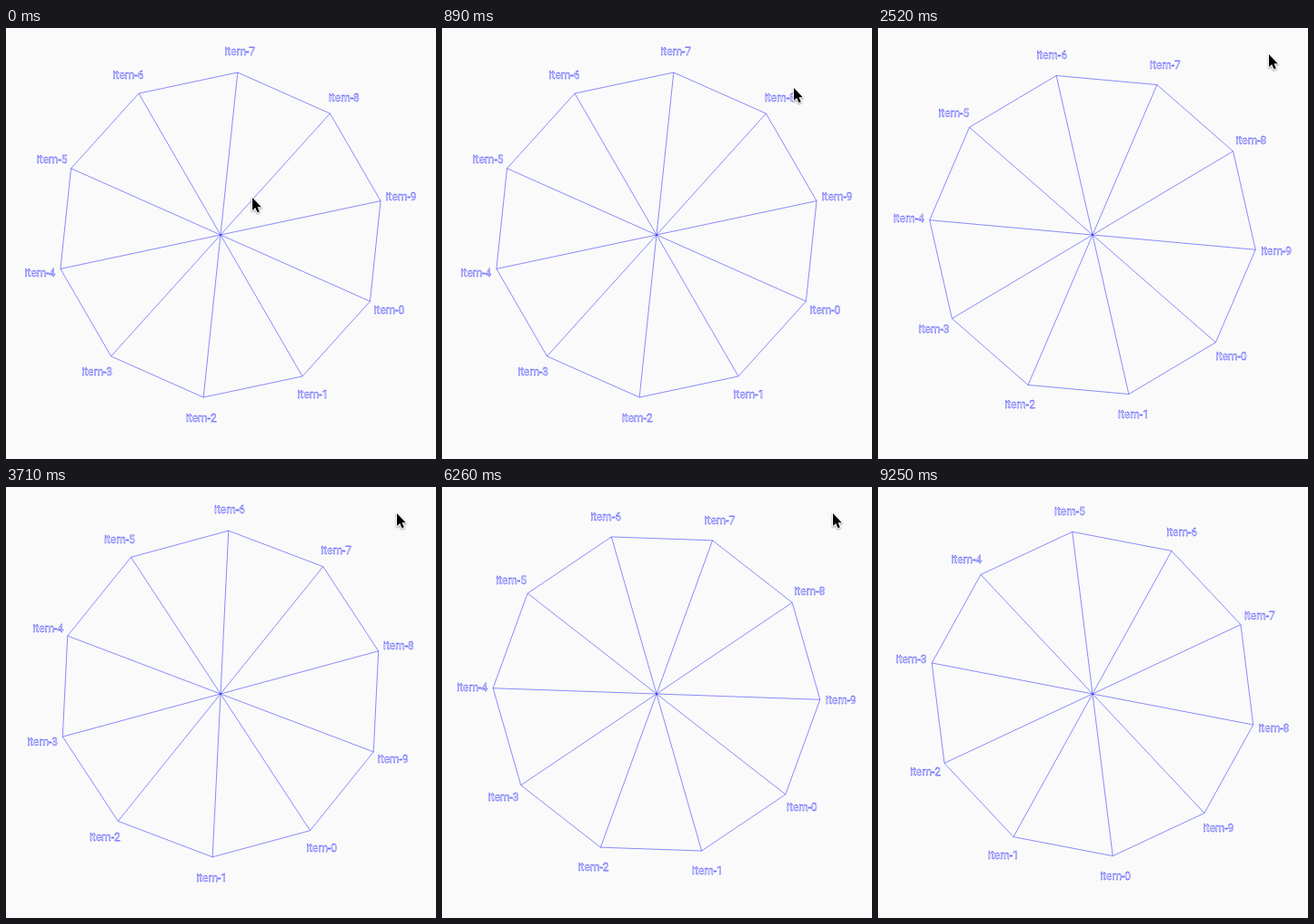
Recreate the animation shown at these times as an HTML page with a canvas. Size 473x475 px, loop 9750 ms.

```html
<!DOCTYPE html>
<html lang="en">
<head>
<meta charset="utf-8">
<title>Item wheel</title>
<style>
  html, body { margin: 0; width: 100%; height: 100%; overflow: hidden; background: #fafafa; }
  canvas { display: block; }
</style>
</head>
<body>
<canvas id="stage" width="473" height="475"></canvas>
<script>
const ctx = document.getElementById('stage').getContext('2d');
const LOOP = 9750, COUNT = 10, CX = 236, CY = 228, RADIUS = 180, LABEL_RADIUS = 203;

// The wheel jumps: start ms and angle of item-0 in degrees
const turns = [[0, 24], [1790, 41.2], [3710, 56.8], [6110, 45], [6260, 38], [8360, 82.9]];

// The pointer glides, seen only once per tick: first tick, last tick, end point
const TICK = 149.2, PHASE = 6, HOME = [271, 187];
const glides = [
  [0, 3, 398, 75], [3, 6, 387, 66], [13, 16, 430, 29], [58, 59, 443, 414], [59, 62, 443, 500]
];

const arrow = new Path2D('M0 0V14L3.2 11 5.5 16.2 7.8 15.2 5.6 10.2H9.8Z');

function pointerAt(t) {
  const tick = Math.floor((t + PHASE) / TICK);
  let [x, y] = HOME;
  for (const [from, to, endX, endY] of glides) {
    const p = Math.min(1, Math.max(0, (tick - from) / (to - from)));
    const ease = p * p * (3 - 2 * p);
    x += (endX - x) * ease;
    y += (endY - y) * ease;
  }
  return [x, y];
}

function drawWheel(angle) {
  const point = (i, r) => {
    const a = (angle + i * 360 / COUNT) * Math.PI / 180;
    return [CX + r * Math.cos(a), CY + r * Math.sin(a)];
  };
  ctx.strokeStyle = '#00f';
  ctx.lineJoin = 'round';
  ctx.font = '12px Roboto, sans-serif';
  ctx.textAlign = 'center';
  ctx.textBaseline = 'middle';
  for (let i = 0; i < COUNT; i++) {
    ctx.lineWidth = 0.45;
    ctx.beginPath();
    ctx.moveTo(CX, CY);
    ctx.lineTo(...point(i, RADIUS));
    ctx.lineTo(...point(i + 1, RADIUS));
    ctx.stroke();
    const [x, y] = point(i, LABEL_RADIUS);
    ctx.lineWidth = 0.3;
    ctx.strokeText('item-' + i, x, y + 0.5);
  }
}

function drawPointer(x, y) {
  ctx.save();
  ctx.translate(x, y);
  ctx.lineWidth = 2;
  ctx.strokeStyle = '#fff';
  ctx.shadowColor = 'rgba(0,0,0,.4)';
  ctx.shadowBlur = 2;
  ctx.shadowOffsetY = 1;
  ctx.stroke(arrow);
  ctx.shadowColor = 'transparent';
  ctx.fillStyle = '#000';
  ctx.fill(arrow);
  ctx.restore();
}

const start = performance.now();

function draw() {
  const t = (performance.now() - start) % LOOP;
  ctx.fillStyle = '#fafafa';
  ctx.fillRect(0, 0, 473, 475);
  drawWheel(turns.findLast(([from]) => from <= t)[1]);
  drawPointer(...pointerAt(t));
  requestAnimationFrame(draw);
}
draw();
</script>
</body>
</html>
```
